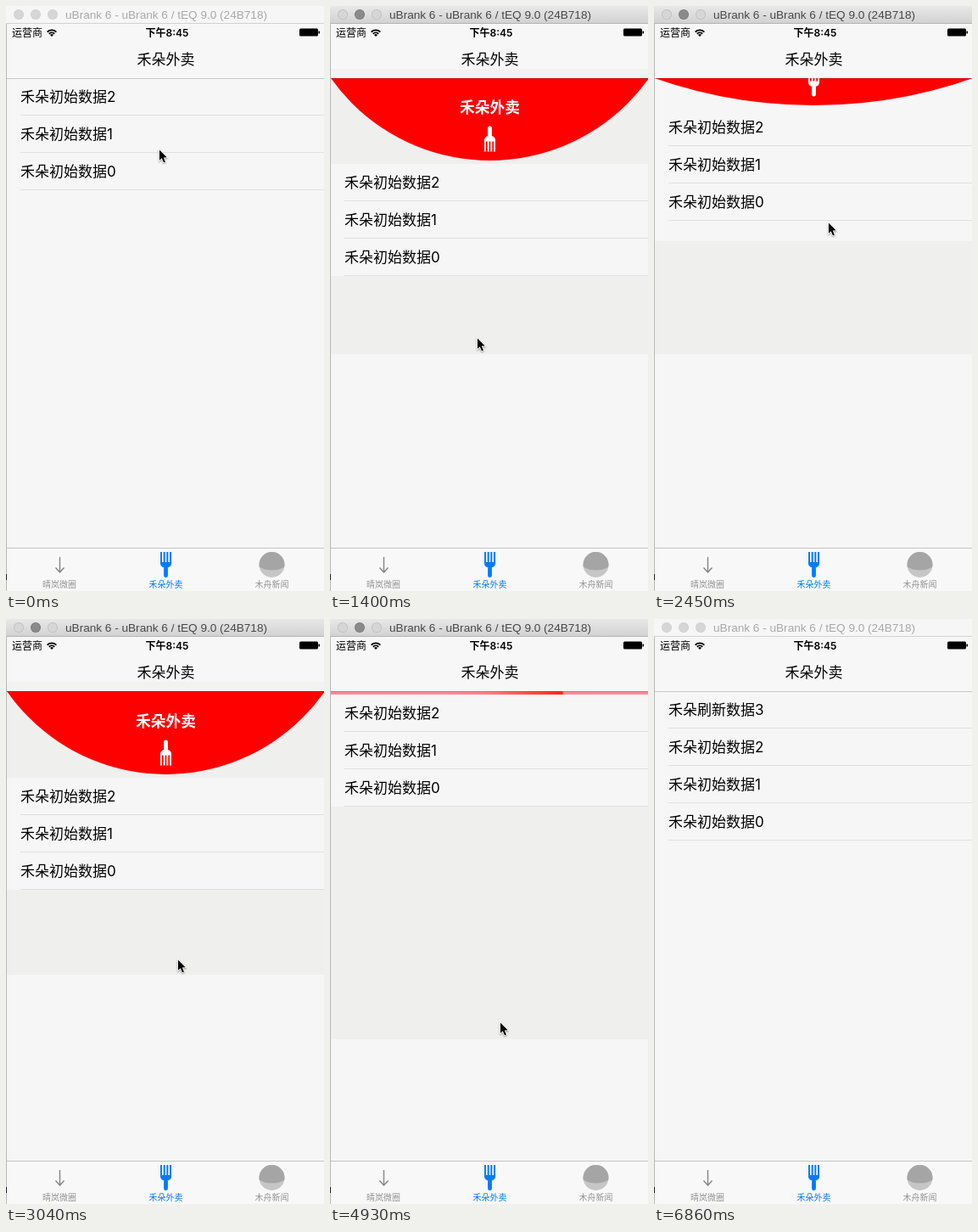
Write an HTML page with a canvas that moves like this. It is 375x689 px and loops after 6.9 s.

```html
<!DOCTYPE html>
<html lang="zh">
<head>
<meta charset="utf-8">
<style>
  html, body { margin: 0; width: 100%; height: 100%; overflow: hidden; background: #f6f6f6; }
  canvas { display: block; }
</style>
</head>
<body>
<canvas id="stage" width="375" height="689"></canvas>
<script>
const ctx = document.getElementById('stage').getContext('2d');
const LOOP = 6900, STEP = 117.4, FIRST = 110, BLUR = 6860;
const RELEASE = 3450, DONE = 5450;
const NAV = 85, ROW = 44;
const CJK = '"Noto Sans CJK SC", "Noto Sans CJK", sans-serif';
const UI = 'Inter, ' + CJK;
const LIGHT = '#f6f6f6', DIM = '#efefee';

// time, x, y of the pointer tip
const pointerPath = [
  [0, 180, 168], [110, 180, 168], [640, 174, 176], [1400, 173, 390], [1520, 173, 390],
  [2050, 200, 176], [2160, 204, 185], [2458, 205, 254], [3045, 202, 400], [3340, 200, 474],
  [5880, 200, 474], [6580, 280, 655], [LOOP, 280, 655]
];

const clamp = (v, lo = 0, hi = 1) => Math.min(hi, Math.max(lo, v));

function pointerAt(t) {
  const i = Math.max(1, pointerPath.findIndex(p => p[0] > t));
  const [t0, x0, y0] = pointerPath[i - 1], [t1, x1, y1] = pointerPath[i];
  const k = (t - t0) / (t1 - t0);
  return { x: x0 + (x1 - x0) * k, y: y0 + (y1 - y0) * k };
}

// Scroll view resistance when dragged beyond its edge
function rubberBand(distance) {
  const k = Math.max(0, distance) * 0.5575 / 667;
  return 667 * k / (1 + k);
}

function pullAt(t) {
  if (t < 640) return 0;
  if (t < RELEASE) return rubberBand(pointerAt(t).y - (t < 2100 ? 176 : 185));
  if (t < DONE) return 4 + 123 * Math.exp((RELEASE - t) / 116);
  return 4 * (1 - clamp((t - DONE) / 180));
}

function rect(x, y, w, h, color) {
  ctx.fillStyle = color;
  ctx.fillRect(x, y, w, h);
}

function disc(x, y, r, color) {
  ctx.fillStyle = color;
  ctx.beginPath();
  ctx.arc(x, y, r, 0, 7);
  ctx.fill();
}

function text(str, x, y, font, color = '#000', align = 'left') {
  ctx.font = font;
  ctx.fillStyle = color;
  ctx.textAlign = align;
  ctx.fillText(str, x, y);
}

function fork(x, y, angle, color) {
  ctx.save();
  ctx.translate(x, y);
  ctx.rotate(angle);
  ctx.fillStyle = color;
  ctx.beginPath();
  for (let i = 0; i < 4; i++) ctx.rect(-6.5 + i * 3.67, -15, 2, 14);
  ctx.roundRect(-6.5, -3, 13, 6.5, [0, 0, 5, 5]);
  ctx.roundRect(-2.4, 1, 4.8, 14, 2.2);
  ctx.fill();
  ctx.restore();
}

function pullHeader(pull, loading) {
  const bottom = NAV + pull;
  const depth = (pull - 4) * (loading ? 1.13 : 1);
  if (depth > 0.5) {
    const r = (187.5 ** 2 + depth ** 2) / (2 * depth);
    disc(188.5, bottom - 4 - r, r, '#f00');
    text('禾朵外卖', 188.5, bottom - 60, '900 17.7px ' + CJK, '#fff', 'center');
    fork(188.5, bottom - 29.5, loading ? Math.PI : Math.PI * clamp((pull - 45) / 40), '#fff');
  }
}

function progressBar(y, t) {
  const head = 28 + (t - 3632) * 0.191;
  const g = ctx.createLinearGradient(head - 140, 0, head, 0);
  g.addColorStop(0, '#ff8a9b');
  g.addColorStop(0.35, '#ff8088');
  g.addColorStop(1, '#ff2a10');
  rect(1, y, 374, 4, '#ff8a9b');
  if (head > 1) rect(Math.max(1, head - 140), y, Math.min(140, head - 1), 4, g);
}

function list(t) {
  const pull = Math.round(pullAt(t)), top = NAV + pull;
  const loading = t >= RELEASE, dragging = t >= 640 && !loading;
  const rows = ['禾朵初始数据2', '禾朵初始数据1', '禾朵初始数据0'];
  if (t >= DONE) rows.unshift('禾朵刷新数据3');
  const bottom = top + rows.length * ROW;
  const pointerY = pointerAt(t).y;

  ctx.save();
  ctx.beginPath();
  ctx.rect(1, NAV, 374, 553);
  ctx.clip();

  // Area that has been repainted so far is slightly darker
  if (t >= 640 && t < BLUR) {
    let reach = t < 1400 ? pointerY + 20 : Math.max(410, pointerY + 19);
    if (t >= 3340) reach = 495;
    const from = Math.round(dragging && pull < 60 ? Math.max(bottom, pointerY + 23) : bottom);
    reach = Math.round(reach);
    if (reach > from) rect(1, from, 374, reach - from, DIM);
    if (dragging && pull >= 60) rect(1, NAV, 374, pull, DIM);
  }

  pullHeader(pull, loading);
  rect(1, top, 374, rows.length * ROW, LIGHT);
  if (loading && pull > 0) progressBar(top - 4, t);
  rows.forEach((label, i) => {
    const y = top + i * ROW;
    text(label, 17, y + 28, '17px ' + UI);
    rect(17, y + 43, 358, 1, '#e0e0e0');
  });
  ctx.restore();
}

function titleBar(active) {
  const g = ctx.createLinearGradient(0, 0, 0, 20);
  g.addColorStop(0, active ? '#e8e8e8' : LIGHT);
  g.addColorStop(1, active ? '#d2d2d2' : LIGHT);
  rect(0, 0, 375, 20, g);
  rect(0, 20, 375, 1, active ? '#b4b4b4' : '#d2d2d2');
  [15, 35, 55].forEach((x, i) => {
    disc(x, 10, 6, active ? (i === 1 ? '#777' : '#bdbdbd') : '#cecece');
    disc(x, 10, 5.2, active ? (i === 1 ? '#8a8a8a' : '#d6d6d6') : '#d6d6d6');
  });
  text('uBrank 6 - uBrank 6 / tEQ 9.0 (24B718)', 70, 15,
    '13.6px "Liberation Sans", sans-serif', active ? '#484848' : '#a8a8a8');
}

function wifi(x, y) {
  ctx.strokeStyle = '#000';
  ctx.lineWidth = 1.8;
  for (const r of [5, 8]) {
    ctx.beginPath();
    ctx.arc(x, y, r - 0.4, -Math.PI * 0.75, -Math.PI * 0.25);
    ctx.stroke();
  }
  ctx.fillStyle = '#000';
  ctx.beginPath();
  ctx.moveTo(x, y);
  ctx.arc(x, y, 2.8, -Math.PI * 0.75, -Math.PI * 0.25);
  ctx.fill();
}

function navBar(t) {
  const pull = pullAt(t);
  rect(1, 21, 374, 64, '#f7f7f7');
  // Content behind the translucent bar tints its lower edge
  if (t >= RELEASE && pull > 12) rect(1, 77, 374, 8, '#fdeeee');
  else if (pull >= 60) rect(1, 74, 374, 11, '#f2f2f1');
  rect(1, NAV, 374, 1, 'rgba(0,0,0,.19)');
  text('运营商', 7, 35.5, '12px ' + UI);
  wifi(54, 36);
  text('下午8:45', 190, 35.5, '600 12px ' + UI, '#000', 'center');
  ctx.fillStyle = '#000';
  ctx.beginPath();
  ctx.roundRect(346, 26.5, 22, 9, 1.5);
  ctx.rect(368.5, 29.5, 1.5, 3);
  ctx.fill();
  text('禾朵外卖', 188.5, 69, '500 17px ' + CJK, '#000', 'center');
}

function tabBar() {
  rect(1, 638, 374, 51, '#f8f8f8');
  rect(1, 638, 374, 1, '#c4c4c4');

  ctx.strokeStyle = '#858585';
  ctx.lineWidth = 1.4;
  ctx.beginPath();
  ctx.moveTo(63.5, 649);
  ctx.lineTo(63.5, 667);
  ctx.moveTo(58.5, 661.5);
  ctx.lineTo(63.5, 667);
  ctx.lineTo(68.5, 661.5);
  ctx.stroke();

  fork(188.5, 658, 0, '#007aff');

  disc(313.5, 658, 15, '#c6c6c6');
  ctx.save();
  ctx.clip();
  ctx.fillStyle = '#a5a5a5';
  ctx.beginPath();
  ctx.ellipse(313.5, 650, 22, 14.5, 0, 0, 7);
  ctx.fill();
  ctx.restore();

  const label = (str, x, color) => text(str, x, 685, '10px ' + CJK, color, 'center');
  label('晴岚微圈', 63, '#929292');
  label('禾朵外卖', 188.5, '#007aff');
  label('木舟新闻', 313.5, '#929292');
}

function pointer({ x, y }) {
  ctx.save();
  ctx.translate(Math.round(x) + 0.5, Math.round(y) + 1.5);
  ctx.scale(0.88, 0.88);
  ctx.beginPath();
  [[0.5, 0], [0.5, 14], [3.7, 11], [6.2, 16.8], [8.4, 15.8], [6, 10.3], [10.4, 10]]
    .forEach(p => ctx.lineTo(...p));
  ctx.closePath();
  ctx.shadowColor = 'rgba(0,0,0,.4)';
  ctx.shadowBlur = 2;
  ctx.shadowOffsetY = 1;
  ctx.strokeStyle = '#fff';
  ctx.lineWidth = 1.8;
  ctx.stroke();
  ctx.shadowColor = 'transparent';
  ctx.fillStyle = '#000';
  ctx.fill();
  ctx.restore();
}

function stepTime(t) {
  if (t < FIRST) return 0;
  if (t >= BLUR) return t;
  return FIRST + Math.floor((t - FIRST + 12) / STEP) * STEP;
}

function draw(now) {
  const t = stepTime(now % LOOP);
  rect(0, 0, 375, 689, LIGHT);
  list(t);
  navBar(t);
  tabBar();
  titleBar(t >= FIRST && t < BLUR);
  rect(0, 21, 1, 668, '#b8b8b8');
  rect(0, 669, 1, 7, '#1c1c38');
  if (t < BLUR) pointer(pointerAt(t));
}

const start = performance.now();
function tick() {
  draw(performance.now() - start);
  requestAnimationFrame(tick);
}
tick();
</script>
</body>
</html>
```
